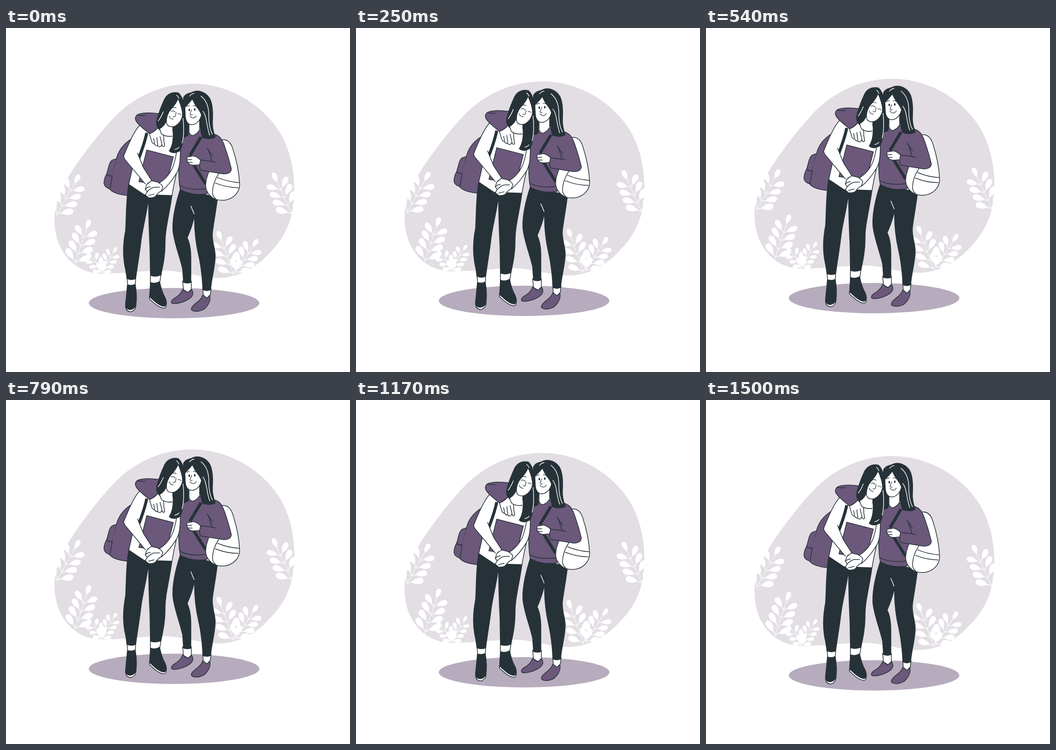
An HTML page that plays this animation: 748x748 px, repeating every 1540 ms.

```html
<!DOCTYPE html>
<html lang="en">
<head>
<meta charset="utf-8">
<title>Two friends</title>
<style>
html, body { margin: 0; width: 100%; height: 100%; overflow: hidden; background: #fff; }
svg { display: block; width: 100vw; height: 100vh; }
#people { stroke: #263238; stroke-width: 1.5; stroke-linejoin: round; stroke-linecap: round; }
.p { fill: #6b587b; }
.w { fill: #fff; }
.d { fill: #263238; }
.l { fill: none; }
.face { fill: none; stroke-width: 1.2; }
.strap { fill: none; stroke-width: 6.5; stroke-linecap: butt; }
.hi { fill: none; stroke: #fff; stroke-width: 1.4; }
#plants { fill: #fff; stroke: none; }
#plants line { stroke: #fff; stroke-width: 1; }
</style>
</head>
<body>
<svg viewBox="0 0 748 748">
<g id="scene">
  <path fill="#e2dee4" d="M402 121C480 120 554 162 595 226C617 262 627 308 627 350C628 405 612 452 570 492C545 520 505 542 465 543C420 543 385 527 340 527C300 527 262 534 205 534C165 532 138 512 120 480C108 456 104 430 106 405C109 370 128 333 152 298C180 258 208 222 240 189C285 146 340 122 402 121Z"/>
  <g id="plants"></g>
  <ellipse cx="365.500" cy="598" rx="185.500" ry="33" fill="#b6acbd"/>
  <g id="people">
    <!-- right friend: legs and shoes -->
    <path class="w" d="M384 550L386 569 396 575 403 568V550ZM428 566L429 582 436 588 444 581 446 566Z"/>
    <path class="p" d="M384 568C389 571 392 574 395 575L404 569C408 576 407 583 398 589C386 597 370 600 362 599C357 597 360 591 367 587C374 583 381 576 384 568Z"/>
    <path class="p" d="M428 580L437 587 443 581C446 591 441 602 431 611C421 617 407 618 403 612C402 606 411 600 418 594C423 590 426 586 428 580Z"/>
    <path class="d" d="M379 350C368 384 361 415 363 442C366 468 377 494 384 524L386 553Q395 556 402 553L402 500C402 482 400 468 394 456C401 440 408 422 410 404C409 440 413 470 419 495C425 522 427 545 428 569Q437 573 445 569C447 542 455 520 455 494C454 476 447 462 449 444C452 420 457 396 460 368Z"/>
    <path class="hi" d="M402 387L409 404"/>
    <!-- right friend: sweater and bag -->
    <path class="p" d="M387 234L399 227 420 223 450 230Q465 234 470 246L460 300 437 360C416 364 395 360 379 351C375 335 375 300 376 265Z"/>
    <path class="l" d="M379 343C395 351 415 352 436 349"/>
    <path class="strap" d="M424 237L400 277M403 289L434 339"/>
    <path class="w" d="M468 243C482 241 489 249 493 262C501 286 507 315 508 340C508 358 494 371 477 374C461 376 449 371 442 362C433 352 433 341 436 328C440 312 446 300 455 290Z"/>
    <path class="l" d="M463 316C455 328 449 343 449 358Q450 367 456 371M460 325C474 331 491 335 507 336M455 337C470 343 489 347 505 347"/>
    <path class="p" d="M450 230C463 232 469 240 474 253C481 272 486 289 490 306C490 314 482 318 472 317L423 309C420 302 420 294 423 287L448 290 440 264"/>
    <path class="l" d="M437 261L449 278M448 290L456 292"/>
    <path class="w" d="M423 287L417 282Q408 276 403 279L394 280Q392 286 396 293Q401 299 411 298L421 297Z"/>
    <path class="l" d="M395 286H404M396 292L405 292"/>
    <!-- right friend: head -->
    <path class="d" d="M386 151C391 141 402 142 406 139C420 133 436 141 443 153C449 164 450 184 449 202C448 216 452 229 455 237C447 242 436 241 427 238L421 212 397 210 396 233Q390 238 383 236Z"/>
    <path class="w" d="M398 200V226Q401 235 408 233Q417 229 421 221V195Z"/>
    <path class="w" d="M405 154C400 162 392 168 389 173L390 193C391 204 397 211 406 210C417 208 424 198 426 184C418 177 410 165 405 154Z"/>
    <path class="d" stroke="none" d="M405 153C412 169 421 179 425 190C424 207 427 226 436 239L449 235 438 160 415 143Z"/>
    <path class="face" d="M393 171Q396 168 399 169M407 169Q410 167 413 170M404 177L400 187Q402 190 405 188M400 191Q407 200 414 191"/>
    <ellipse class="d" cx="398.500" cy="178" rx="1" ry="2"/>
    <ellipse class="d" cx="410.500" cy="177" rx="1" ry="2"/>
    <path class="hi" d="M424 148C437 158 441 175 441 190C441 210 444 222 449 231M428 181C437 191 436 215 443 233M399 148Q403 143 409 142"/>
    <!-- left friend: backpack -->
    <path class="p" d="M285 234C262 245 246 260 240 284C234 305 229 320 224 341C221 352 234 361 264 364L276 345 300 260Z"/>
    <path class="p" d="M240 284L231 287Q226 290 223 302L219 317Q223 323 230 321"/>
    <path class="p" d="M219 317Q213 327 213 338Q214 346 226 350L231 321Q223 323 219 317Z"/>
    <!-- left friend: legs and shoes -->
    <path class="w" d="M263 543L265 561H281L282 543ZM314 537L314 555H334L337 537Z"/>
    <path class="d" d="M264 558Q273 561 281 557C284 574 285 590 282 605C279 614 273 617 267 616C259 614 259 604 261 590Z"/>
    <path class="w" d="M260 604Q263 613 271 612Q279 611 283 602Q282 614 272 617Q261 617 260 604Z"/>
    <path class="d" d="M314 553Q325 557 334 551C337 566 341 578 346 586C351 598 349 607 343 608C331 605 322 596 312 588Z"/>
    <path class="w" d="M312 584C322 593 331 603 343 605Q348 604 348 599Q350 608 343 609C330 607 321 597 312 589Z"/>
    <path class="d" d="M267 339C261 370 262 405 260 440C254 470 254 500 260 525L263 545Q273 549 282 545C286 515 291 487 294 460C298 432 306 402 310 371C310 405 311 440 313 480L314 538Q325 542 337 537C341 518 346 496 346 470C345 440 355 408 361 363Z"/>
    <!-- left friend: shirt, book and arms -->
    <path class="w" d="M290 211C300 211 310 222 338 220L362 221 379 265C377 295 366 330 361 364L300 362 267 340 276 300Z"/>
    <path class="l" d="M338 230Q348 237 361 235"/>
    <path class="strap" d="M306 228C302 249 296 263 289 283"/>
    <path class="p" d="M306 265L364 280 348 342 289 334Z"/>
    <path class="w" d="M379 267C379 292 377 306 370 317C362 330 351 344 338 355L328 340C342 332 353 323 362 304C367 292 369 281 371 269Z"/>
    <path class="w" stroke="none" d="M291 211C278 224 265 256 256 278Q256 284 263 291L303 339 317 332 299 304 286 272 299 225Z"/>
    <path class="l" d="M291 211C278 224 265 256 256 278Q256 284 263 291L303 339M317 332L299 304 286 272"/>
    <path class="w" d="M316 332L329 335Q337 338 341 345L338 354Q330 358 325 366Q320 370 310 369L303 363 307 356 303 350 306 340Z"/>
    <path class="l" d="M307 356Q315 347 323 346L334 346M303 350Q308 345 314 345M310 364L322 361"/>
    <!-- arm around the shoulder -->
    <path class="p" d="M332 186C316 184 301 183 289 187C281 190 279 197 284 204C291 214 303 222 312 230Q323 225 331 216Z"/>
    <path class="l" d="M285 189Q294 191 303 190"/>
    <path class="w" d="M312 230Q323 226 330 217L339 226Q344 235 343 244L345 256Q341 261 339 253L337 257Q333 260 330 256Q326 257 323 252Q318 252 316 244Z"/>
    <path class="l" d="M321 240L323 251M328 238L330 255M335 236L339 252"/>
    <!-- left friend: head -->
    <path class="d" d="M375 141C362 138 351 143 345 154C337 171 332 185 328 200C326 211 329 218 335 219L362 213C365 235 363 255 355 267C360 273 374 273 380 263C387 248 387 215 385 194C388 178 389 154 375 141Z"/>
    <path class="w" stroke="none" d="M349 200C347 208 341 215 334 219L338 230Q348 237 361 235L362 212Z"/>
    <path class="l" d="M349 200C347 208 341 215 334 219L338 230Q348 237 361 235"/>
    <path class="w" d="M374 153C370 167 359 174 354 183C349 192 347 204 351 211Q358 217 368 213C377 208 382 200 384 190C384 176 379 164 374 153Z"/>
    <path class="face" d="M359 181Q364 178 368 183M374 187Q377 185 381 189M363 173Q367 171 370 174M370 184L368 192Q366 194 363 192M355 191Q357 198 364 198"/>
    <path class="hi" d="M342 182Q337 194 331 202M371 146Q375 149 376 153M385 196C387 216 387 235 383 250M367 264Q373 263 376 259"/>
  </g>
</g>
</svg>
<script>
const scene = document.getElementById('scene');
const plants = document.getElementById('plants');

function leaf(x, y, angle, size) {
  const deg = angle * 180 / Math.PI;
  return `<path transform="translate(${x} ${y}) rotate(${deg}) scale(${size})"
    d="M0 -.02L.25 -.02C.4 -.1 .5 -.19 .75 -.19C.92 -.19 1 -.1 1 0C1 .1 .92 .19 .75 .19C.5 .19 .4 .1 .25 .02L0 .02Z"/>`;
}

function sprig(x0, y0, x1, y1, pairs, size) {
  const angle = Math.atan2(y1 - y0, x1 - x0);
  let shapes = `<line x1="${x0}" y1="${y0}" x2="${x1}" y2="${y1}"/>` + leaf(x1, y1, angle, size * .82);
  for (let i = 0; i < pairs; i++) {
    const k = (i + .3) / pairs;
    const x = x0 + (x1 - x0) * k, y = y0 + (y1 - y0) * k;
    for (const side of [-1, 1]) shapes += leaf(x, y, angle + side * .88, size * (1.05 - k * .15));
  }
  plants.innerHTML += shapes;
}

sprig(109, 409, 146, 343, 4, 34);
sprig(149, 515, 173, 443, 4, 34);
sprig(204, 535, 231, 492, 4, 22);
sprig(214, 532, 189, 502, 3, 22);
sprig(623, 408, 592, 340, 4, 34);
sprig(496, 539, 470, 467, 4, 33);
sprig(498, 535, 533, 481, 4, 31);
plants.innerHTML += '<ellipse cx="209" cy="520" rx="9" ry="8"/><ellipse cx="520" cy="527" rx="9" ry="6"/>';

// Linear rise and fall, stepped at 24 pictures a second.
const LOOP = 1540, STEP = 1000 / 24;
const start = performance.now();
function draw(now) {
  const elapsed = Math.max(0, now - start) % LOOP;
  const t = Math.floor((elapsed + 4) / STEP) * STEP;
  const y = .02 * Math.abs(t - 737) - 14.6;
  scene.setAttribute('transform', `translate(0 ${y.toFixed(2)})`);
  requestAnimationFrame(draw);
}
draw(start);
</script>
</body>
</html>
```
